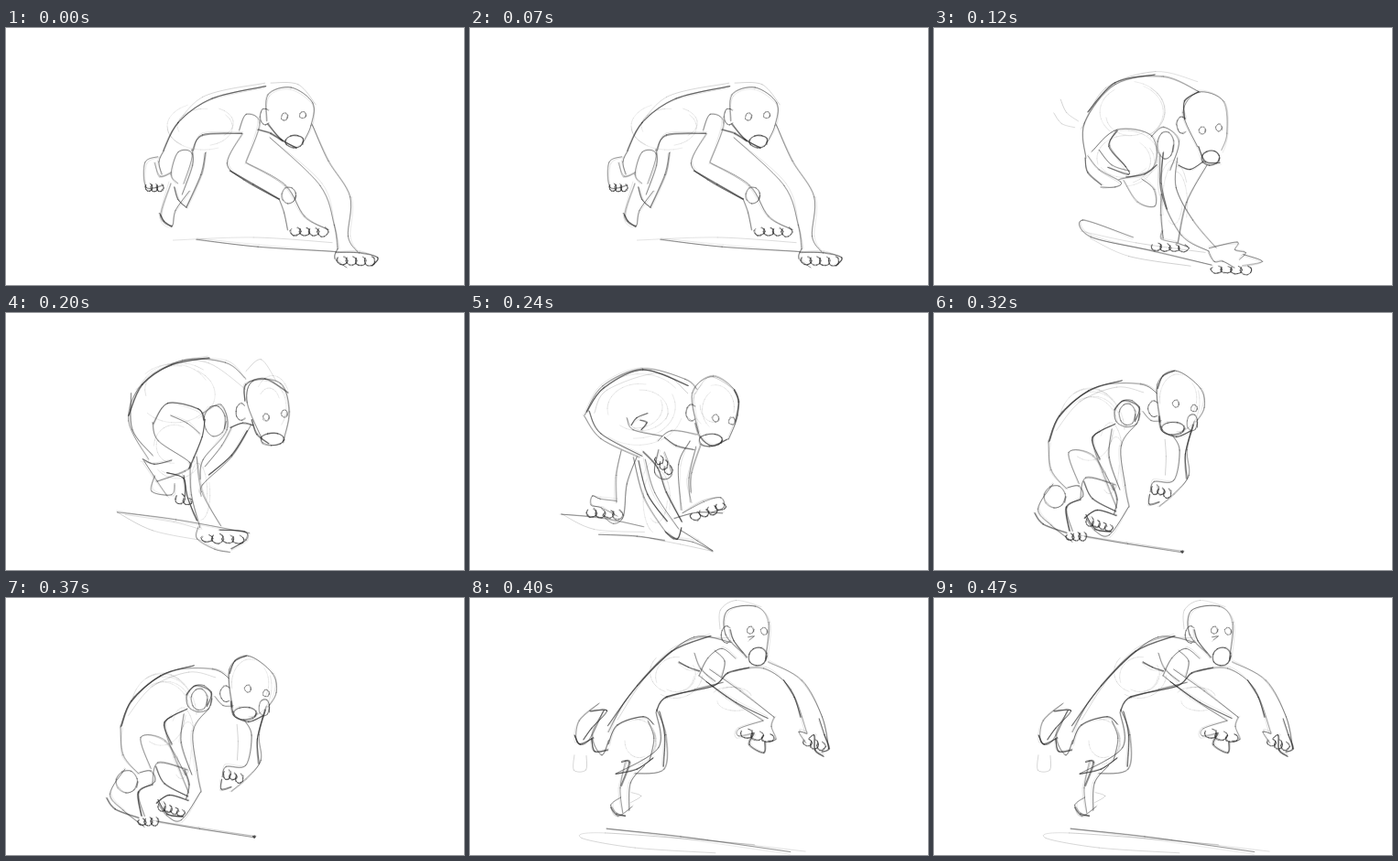
An HTML page with a canvas that plays this animation: 500x281 px, repeating every 520 ms.

```html
<!DOCTYPE html>
<html lang="en">
<head>
<meta charset="utf-8">
<title>Running ape, pencil test</title>
<style>
html, body { margin: 0; width: 100%; height: 100%; overflow: hidden; background: #fff; }
canvas { display: block; width: 500px; height: 281px; }
</style>
</head>
<body>
<canvas id="stage"></canvas>
<script>
const W = 500, H = 281, LOOP = 520;
const canvas = document.getElementById("stage");
const ctx = canvas.getContext("2d");
const ratio = window.devicePixelRatio || 1;
canvas.width = W * ratio;
canvas.height = H * ratio;

let seed = 1;
function rand() {
  seed = (seed * 16807) % 2147483647;
  return seed / 2147483647;
}
const jitter = size => (rand() - 0.5) * 2 * size;

// Smooth curve through the points, pressed harder on some spans
function trace(p, width, alpha) {
  for (let i = 0; i < p.length - 1; i++) {
    const a = p[i - 1] || p[i], b = p[i], c = p[i + 1], d = p[i + 2] || c;
    ctx.lineWidth = width * (0.85 + rand() * 0.3);
    ctx.strokeStyle = `rgba(38,38,38,${alpha * (0.8 + rand() * 0.4)})`;
    ctx.beginPath();
    ctx.moveTo(b[0], b[1]);
    ctx.bezierCurveTo(b[0] + (c[0] - a[0]) / 6, b[1] + (c[1] - a[1]) / 6,
      c[0] - (d[0] - b[0]) / 6, c[1] - (d[1] - b[1]) / 6, c[0], c[1]);
    ctx.stroke();
  }
}

const points = text => text.split(" ").map(q => q.split(",").map(Number));
const shake = (p, size) => p.map(q => q.map(v => v + jitter(size)));

// Two close passes and one loose construction line
function pencil(p, width, alpha, loose = 2.2) {
  trace(shake(p, 0.5), width, alpha);
  trace(shake(p, 0.8), width, alpha * 0.7);
  if (loose) trace(shake(p, loose), 0.6, 0.17);
}
const bold = text => pencil(points(text), 1.1, 0.56);
const thin = text => pencil(points(text), 0.8, 0.44);
const soft = text => trace(shake(points(text), 0.5), 0.7, 0.25);

function ring(x, y, rx, ry, from = 0, sweep = 6.8) {
  const p = [];
  for (let i = 0; i <= 8; i++) {
    const a = from + sweep * i / 8;
    p.push([x + rx * Math.cos(a), y + ry * Math.sin(a)]);
  }
  return p;
}
const oval = (x, y, rx, ry) => pencil(ring(x, y, rx, ry), 0.8, 0.42, 1);

// A row of knuckles from one end to the other
function toes(x, y, x2, y2, n = 4) {
  const r = Math.hypot(x2 - x, y2 - y) / n / 2 + 0.8;
  for (let i = 0; i < n; i++) {
    const k = (i + 0.5) / n;
    const p = ring(x + (x2 - x) * k, y + (y2 - y) * k, r, 4.5 + jitter(1), -1.2, 5);
    pencil(p, 1, 0.52, 0);
  }
}

// Faint searching arcs over a body mass
function search(x, y, rx, ry, n = 5) {
  for (let i = 0; i < n; i++) {
    const k = 0.6 + rand() * 0.5;
    trace(ring(x + jitter(4), y + jitter(4), rx * k, ry * k, rand() * 6, 2), 0.6, 0.17);
  }
}

function head(skull, ear, eyes, x, y, rx, ry) {
  thin(skull);
  const [ex, ey] = points(ear)[0];
  pencil(ring(ex, ey, 6, 9, 0.9, 4.5), 0.8, 0.44, 1);
  for (const [u, v] of points(eyes)) pencil(ring(u, v, 3.6, 4), 0.75, 0.42, 0);
  pencil(ring(x, y, rx, ry), 1.05, 0.5, 1.5);
}

function reach() {
  head("285,102 286,73 311,65 335,82 333,107 325,124", "283,97", "304,97 324,95", 315,124, 10,7);
  bold("286,105 300,122 317,131");
  bold("172,134 188,103 225,77 284,64");
  soft("180,115 214,76 283,60");
  soft("289,60 319,62 338,84");
  search(218, 105, 38, 24);
  thin("172,134 167,146 170,160");
  thin("166,141 152,147 153,174 172,172");
  thin("162,147 168,162 180,158");
  toes(153,174, 171,175, 3);
  thin("188,170 180,160 188,136 203,138 194,170");
  thin("180,170 169,206 181,216 185,200 200,178");
  bold("168,203 173,211 181,217");
  thin("203,133 204,150 192,182");
  bold("204,134 215,117 258,115");
  bold("218,136 213,160 197,196");
  bold("184,174 188,188 197,196");
  thin("254,112 262,94 277,104 262,147");
  thin("258,116 241,148 260,166 298,187");
  thin("262,147 305,172 326,206 352,220");
  bold("244,156 270,171 298,187");
  thin("298,187 304,202 307,221");
  oval(309,183, 8,9);
  toes(311,222, 351,223);
  bold("275,111 289,115 302,124");
  thin("288,120 343,172 358,215 362,242");
  thin("334,105 352,145 376,185 374,228 384,245");
  thin("362,241 359,252 372,262");
  bold("360,245 386,246 406,251 400,260");
  toes(362,254, 402,255);
  soft("182,232 270,229 356,235");
  thin("208,231 275,239 360,245");
}

function plant() {
  head("288,130 272,92 288,70 316,80 320,115 314,134", "271,106", "293,112 311,109", 302,142, 10,8);
  bold("274,100 274,80 289,70");
  bold("289,130 296,146 312,147");
  thin("166,142 164,104 198,62 250,53 290,70");
  bold("168,92 198,60 241,51");
  soft("161,110 188,66 242,48 288,59");
  soft("131,93 139,104 154,109");
  soft("138,78 145,92 158,102");
  search(215, 92, 43, 35);
  bold("165,142 168,158 183,172");
  thin("168,140 180,155 204,168 198,174 182,174");
  thin("172,135 200,111 238,118 239,153 202,166");
  thin("180,133 194,150 214,156");
  bold("200,112 191,129 209,152 212,160 190,152");
  thin("207,166 222,190 241,195 240,176 227,165");
  bold("210,163 230,160 243,150");
  search(207, 142, 33, 26);
  thin("237,119 251,108 267,124 258,155");
  oval(253,128, 9,15);
  thin("247,138 248,182 270,227 300,244");
  thin("248,182 248,205 250,230");
  thin("266,142 264,174 282,210 308,240");
  thin("298,150 276,191 266,235");
  bold("267,150 280,155 294,146");
  bold("250,136 248,170 254,198");
  search(262, 190, 16, 45, 4);
  toes(238,239, 277,241);
  thin("249,222 248,231 265,235 276,239");
  thin("300,241 331,234 329,243 340,246 334,253");
  thin("300,245 306,256 315,255 328,262");
  toes(303,264, 346,265);
  thin("217,229 163,210 171,228 240,244 303,259");
  soft("160,222 220,235 296,245");
  thin("337,248 359,255 337,260");
  soft("170,230 213,249 280,260");
}

function fold() {
  head("280,138 263,98 270,74 300,77 309,108 303,140", "257,108", "284,114 304,110", 291,138, 13,7);
  bold("261,96 262,78 283,72 308,87");
  bold("268,117 274,133 287,143");
  soft("262,64 278,51 295,74");
  search(287, 101, 18, 28, 3);
  thin("156,160 134,118 148,78 192,52 240,54 262,72");
  bold("134,112 149,78 181,57 222,49");
  thin("137,88 138,128 160,156");
  soft("142,84 182,55 222,55 262,84");
  search(185, 87, 46, 35);
  bold("161,121 176,99 210,105 216,117");
  thin("160,120 166,140 200,163 196,173 165,184");
  bold("217,116 214,135 205,158 200,170");
  thin("180,112 198,121 212,132");
  bold("149,160 162,165 181,161");
  thin("151,162 165,184 176,200");
  thin("162,178 159,195 181,199 184,187");
  bold("176,175 194,181 196,200");
  toes(186,202, 202,207, 2);
  search(185, 148, 27, 29, 4);
  thin("215,110 235,100 241,128 215,160 212,182");
  oval(228,118, 12,17);
  thin("201,163 202,199 212,235");
  thin("208,157 214,195 235,233");
  bold("194,178 198,202 208,227");
  thin("268,122 246,157 215,187 213,200");
  thin("246,125 236,145 217,168");
  bold("263,129 246,155 222,177");
  bold("245,125 258,120 270,123");
  search(213, 195, 12, 35, 3);
  thin("210,234 209,247 228,258 244,261");
  bold("233,237 261,239 262,248 246,258");
  toes(214,246, 259,248);
  thin("121,218 185,226 266,240");
  soft("121,218 160,238 215,249");
  soft("130,220 183,229 212,236");
}

function tuck() {
  head("250,131 243,87 265,69 290,86 292,112 282,138", "242,109", "268,115 286,118", 263,139, 13,7);
  bold("246,120 251,135 264,145 281,138");
  bold("288,84 293,97 290,118");
  soft("246,89 262,70 290,84");
  search(268, 102, 22, 27, 4);
  thin("125,112 145,80 188,61 235,72 248,83");
  bold("127,108 146,82 189,62 238,79");
  thin("125,112 143,137 185,158");
  bold("130,107 143,132 188,156");
  soft("136,109 150,84 207,66 238,88");
  search(183, 105, 48, 38, 7);
  bold("176,123 182,115 194,110");
  bold("186,117 193,120 187,128");
  thin("172,115 178,128 210,134");
  thin("205,140 220,129 248,133");
  bold("212,136 225,145 244,149");
  thin("165,150 160,178 160,207");
  thin("182,157 171,187 168,222 157,230 144,221");
  thin("160,205 142,203 134,200 132,210 143,213 161,222");
  toes(128,218, 166,221);
  bold("189,152 205,169 214,196 231,228");
  thin("178,158 190,202 213,238 222,247");
  bold("184,162 194,198 215,228");
  thin("191,160 202,197 228,236");
  search(206, 202, 16, 39, 4);
  thin("206,149 201,174 212,182 220,176 212,152");
  toes(204,158, 219,174, 3);
  thin("247,146 239,180 241,207");
  thin("240,140 228,166 231,216");
  thin("252,145 242,175 241,196");
  thin("232,219 255,206 274,202 277,213 264,218");
  thin("223,225 248,218 276,219");
  toes(242,224, 278,210);
  bold("214,240 226,247 231,235");
  thin("222,247 243,250 265,260");
  thin("230,238 248,249 265,260");
  thin("100,220 145,224 190,234");
  thin("140,242 182,244 212,249");
  soft("100,220 135,236 190,240");
  soft("197,246 230,253 265,260");
}

function rise() {
  head("247,119 244,78 264,63 291,82 295,103 286,119", "240,105", "264,99 284,104", 261,126, 13,7);
  bold("244,83 250,69 263,63");
  bold("246,113 249,128 265,135 280,129");
  oval(282,120, 6,9);
  search(270, 96, 22, 31, 3);
  thin("125,140 140,108 180,80 225,78 243,88");
  bold("126,140 137,113 169,85 205,74");
  thin("125,140 128,171 145,192");
  soft("134,128 160,97 200,81 229,87");
  search(171, 128, 36, 44, 6);
  oval(211,110, 14,15);
  oval(211,111, 9,12);
  bold("197,106 207,96 224,103 219,119");
  thin("228,108 237,118 248,118");
  bold("198,121 173,136 181,160");
  thin("182,129 173,139 184,174 199,213");
  thin("222,120 204,145 209,188 213,212");
  thin("194,127 191,158 203,193");
  search(195, 166, 13, 40, 4);
  thin("158,186 147,152 174,156 196,194");
  thin("160,204 166,180 198,188");
  bold("163,184 173,203 198,217");
  bold("195,188 200,204 197,220");
  thin("146,191 158,189 162,201 145,213 151,239");
  thin("130,187 113,214 128,232 151,250");
  bold("160,204 144,212 148,238");
  oval(132,201, 12,12);
  bold("110,219 119,231 145,240");
  toes(145,245, 166,244, 3);
  bold("164,224 178,215 199,222");
  thin("166,224 175,238 191,243 212,212");
  toes(167,227, 194,236);
  bold("166,220 176,236 193,239");
  thin("284,118 276,150 278,178 262,198 246,211");
  bold("283,122 275,154 276,181");
  thin("260,134 268,150 262,183 240,184 236,196");
  bold("236,198 235,209 246,207");
  toes(238,192, 258,198, 3);
  soft("252,138 253,157 252,177");
  thin("165,244 211,252 272,262");
  soft("160,243 210,251 272,261");
  oval(271,261, 1,1);
}

function leap() {
  head("298,60 279,40 281,14 312,9 326,27 323,66", "280,40", "306,35 321,36", 314,64, 10,10);
  bold("284,35 288,47 302,65");
  thin("304,43 310,42 305,46");
  soft("273,34 273,13 291,3 318,10");
  thin("151,147 170,112 205,72 245,43 285,48");
  bold("151,140 183,96 220,58 263,41");
  soft("161,133 191,87 235,48 282,43");
  search(222, 83, 30, 28, 5);
  bold("228,70 238,76 250,80");
  thin("245,60 252,77 268,91");
  thin("250,85 260,65 275,55 290,66");
  thin("267,57 278,69 275,86");
  bold("204,124 215,108 265,96 282,82 304,76");
  thin("213,109 245,100 276,92");
  thin("250,85 279,108 320,134");
  thin("262,78 295,101 332,130");
  bold("258,91 290,114 325,131");
  thin("332,130 329,141 334,154 326,157");
  thin("320,134 294,143 293,151 311,147");
  toes(296,147, 331,154, 3);
  bold("310,148 305,160 321,169 322,157");
  search(287, 109, 30, 16, 3);
  thin("288,80 321,77 350,100 368,148");
  thin("325,70 362,90 384,130 392,165");
  bold("342,90 354,108 361,130");
  bold("381,132 387,150 392,165 384,168");
  thin("368,148 359,146 367,158");
  toes(365,157, 387,163, 3);
  bold("370,154 376,150 377,166 386,173");
  thin("204,122 214,150 212,187 180,192");
  bold("207,124 213,150 211,184");
  thin("203,125 206,164 160,192");
  bold("151,160 161,139 189,130 200,138");
  thin("194,135 201,153 196,178");
  bold("159,192 182,187 200,175");
  search(182, 158, 21, 24, 4);
  thin("170,178 164,208 167,235");
  thin("191,183 175,202 174,232");
  bold("165,179 174,180 165,205");
  thin("165,218 154,226 162,238 177,228");
  bold("154,229 160,236 169,238");
  soft("176,213 187,217 176,224");
  thin("141,115 119,134 116,157 129,157 146,123");
  thin("147,122 133,150 144,172 152,155");
  bold("131,124 150,123 133,142 124,155");
  bold("114,150 120,160 135,153");
  bold("133,154 136,168 151,166");
  soft("114,172 113,188 126,188 127,172");
  thin("149,252 230,261 350,278");
  soft("149,252 260,265 366,277");
  soft("268,279 180,273 122,262 148,257 310,270");
}

const steps = [[0, reach], [120, plant], [200, fold], [240, tuck], [320, rise], [400, leap]];
let shown = -1;

function tick(now) {
  const t = now % LOOP;
  const i = steps.filter(s => s[0] <= t).length - 1;
  if (i === shown) return;
  shown = i;
  seed = 71 + i * 37;
  ctx.setTransform(ratio, 0, 0, ratio, 0, 0);
  ctx.fillStyle = "#fff";
  ctx.fillRect(0, 0, W, H);
  ctx.lineCap = ctx.lineJoin = "round";
  steps[i][1]();
}

let start;
function frame(now) {
  if (start === undefined) start = now;
  tick(Math.max(0, now - start));
  requestAnimationFrame(frame);
}
tick(0);
requestAnimationFrame(frame);
</script>
</body>
</html>
```
